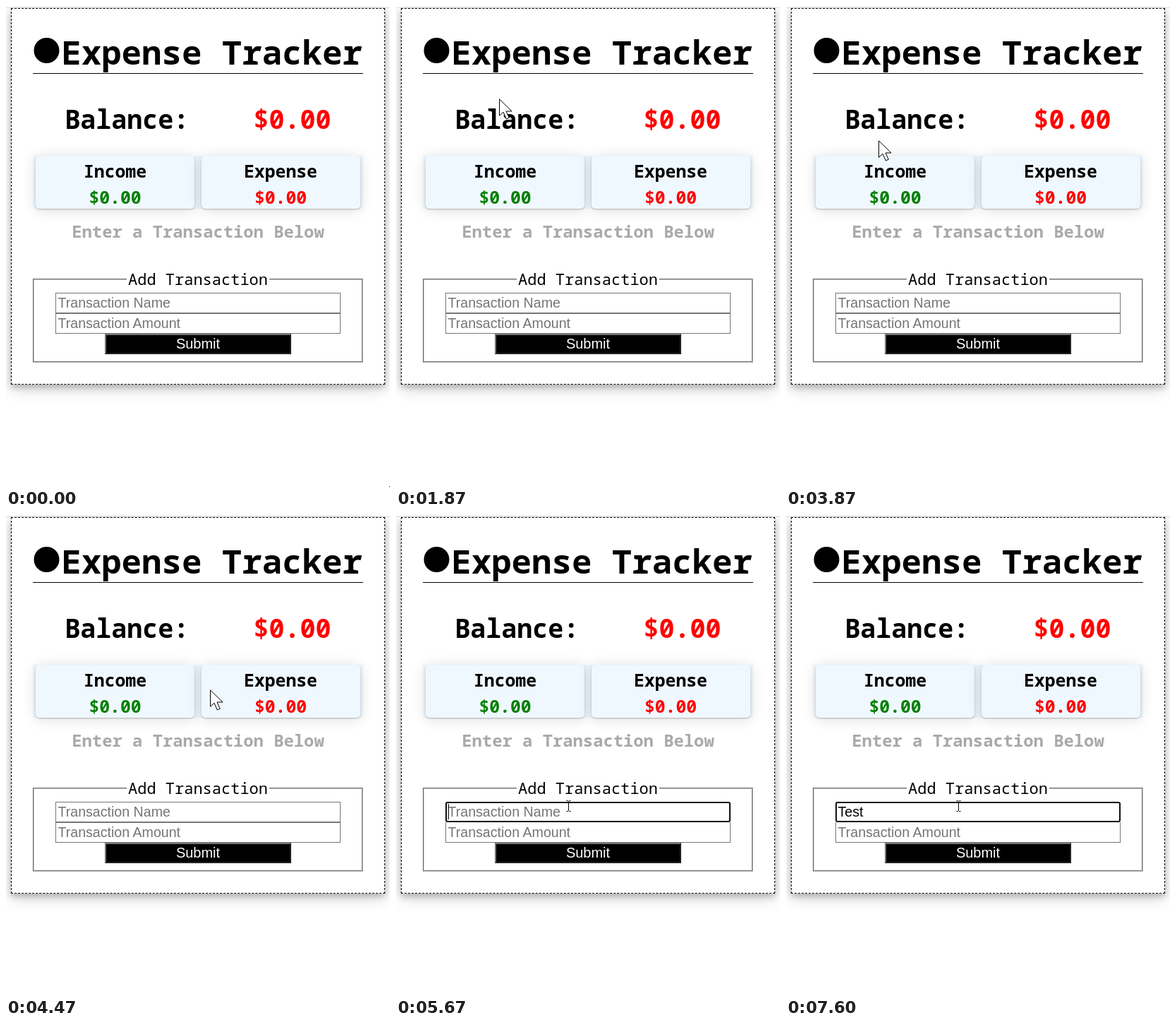
An HTML page that plays this animation: 544x681 px, repeating every 8000 ms.

```html
<!DOCTYPE html>
<html lang="en">
<head>
<meta charset="utf-8">
<title>Expense Tracker</title>
<style>
  html, body { margin: 0; width: 100%; height: 100%; overflow: hidden; background: #fff; }
  .stage { position: relative; width: 544px; height: 681px; overflow: hidden; }
  .stage > * { position: absolute; box-sizing: border-box; }
  .edge { left: 0; top: 2px; width: 544px; height: 1px; background: #e0e0e0; }
  .panel {
    left: 7px; top: 3px; width: 530px; height: 533px;
    background: #fff; border: 1px dashed #000;
    box-shadow: 0 4px 8px rgba(0, 0, 0, .2), 0 6px 20px rgba(0, 0, 0, .19);
  }
  .rule { left: 38px; top: 95px; width: 468px; height: 1px; background: #000; }
  .row { left: 38px; top: 212px; width: 468px; height: 75px; background: aliceblue; }
  .card {
    top: 212px; width: 225px; height: 75px; border-radius: 5px; background: aliceblue;
    box-shadow: 0 1px 2px rgba(0, 0, 0, .25), 0 2px 20px rgba(0, 0, 0, .14);
  }
  .income { left: 42px; }
  .expense { left: 277px; }
  .form { left: 38px; top: 386px; width: 468px; height: 119px; border: 2px groove #c0c0c0; }
  .gap { left: 171px; top: 380px; width: 202px; height: 16px; background: #fff; }
  .field { left: 70px; width: 404px; height: 29px; border: 1px solid #767676; background: #fff; }
  .name { top: 406px; }
  .amount { top: 435px; }
  .name.hover { border-color: #4f4f4f; }
  .name.focus { border: 2px solid #101010; border-radius: 3px; box-shadow: 0 0 0 1px #fff; z-index: 1; }
  .button { left: 140px; top: 464px; width: 264px; height: 29px; background: #000; border: 2px outset #767676; }
  svg { left: 0; top: 0; z-index: 2; }
  text { white-space: pre; }
  .mono { font-family: "Noto Sans Mono", "DejaVu Sans Mono", monospace; font-weight: 600; }
  .mid { text-anchor: middle; }
  .h1 { font-size: 47.4px; }
  .h2 { font-size: 36.67px; }
  .h3 { font-size: 24.75px; }
  .note { font-size: 23.83px; fill: #a9a9a9; }
  .legend { font-size: 22px; font-weight: 400; }
  .sans { font: 19.6px "Liberation Sans", Arial, sans-serif; }
  .submit { font-size: 20px; fill: #fff; }
  .hint { fill: #757575; }
  .red { fill: red; }
  .green { fill: green; }
</style>
</head>
<body>
<div class="stage">
  <div class="edge"></div>
  <div class="panel"></div>
  <div class="rule"></div>
  <div class="row"></div>
  <div class="card income"></div>
  <div class="card expense"></div>
  <div class="form"></div>
  <div class="gap"></div>
  <div class="field name" id="field"></div>
  <div class="field amount"></div>
  <div class="button"></div>
  <svg width="544" height="681" viewBox="0 0 544 681">
    <circle cx="57.5" cy="63" r="18"/>
    <g class="mono">
      <text class="h1" x="78.3" y="83">Expense Tracker</text>
      <text class="h2" x="83.3" y="174">Balance:</text>
      <text class="h2 red" x="350.5" y="174">$0.00</text>
      <g class="h3 mid">
        <text x="154.5" y="243">Income</text>
        <text class="green" x="154.5" y="280">$0.00</text>
        <text x="389" y="243">Expense</text>
        <text class="red" x="389" y="280">$0.00</text>
      </g>
      <text class="note mid" x="272" y="328">Enter a Transaction Below</text>
      <text class="legend mid" x="272" y="395">Add Transaction</text>
    </g>
    <g class="sans">
      <text class="hint" id="hint" x="73.5" y="427">Transaction Name</text>
      <text id="typed" x="73.5" y="427"></text>
      <text class="hint" x="73.5" y="456">Transaction Amount</text>
      <text class="submit mid" x="272" y="485">Submit</text>
    </g>
    <rect id="caret" x="74" y="409" width="1" height="22"/>
    <rect id="speck" x="543" y="680" width="1" height="1"/>
    <g id="cursor">
      <path id="arrow" d="M.5 .9V24.3L6 19.2L10.3 29L14.2 27.3L10 18H18Z" fill="#fff" stroke="#000"/>
      <path id="beam" d="M-2.5 -7.5H-.5L.5 -6.5L1.5 -7.5H3.5M.5 -6.5V6.5M-2.5 7.5H-.5L.5 6.5L1.5 7.5H3.5" fill="none" stroke="#000"/>
    </g>
  </svg>
</div>
<script>
  const LOOP = 8000, FOCUS = 5670, BLINK = 530;
  const el = id => document.getElementById(id);
  const show = (id, on) => { el(id).style.visibility = on ? 'visible' : 'hidden'; };

  function move(from, to, d) {
    const curve = document.createElementNS('http://www.w3.org/2000/svg', 'path');
    curve.setAttribute('d', d);
    return { from, to, curve, length: curve.getTotalLength() };
  }

  // pointer moves: first and last tick (1/15 s), curve
  const moves = [
    move(7, 12, 'M436 656Q290 500 125 494'),
    move(15, 17, 'M125 494V487'),
    move(20, 25, 'M125 487C66 180 72 120 95 134'),
    move(27, 34, 'M95 134Q200 130 328 108'),
    move(50, 63, 'M328 108C250 150 200 195 132 190C97 188 97 194 143 193'),
    move(63, 76, 'M143 193C355 190 320 330 175 397'),
    move(76, 80, 'M175 397L230 424'),
    move(81, 85, 'M230 424Q238 422 244 412')
  ];

  const word = 'Test ';
  const keyTimes = [5870, 6130, 6730, 6870, 7070];

  const easeOut = u => 1 - (1 - u) ** 1.6;

  // ticks start at multiples of 1/15 s, rounded to 10 ms
  function tickAt(t) {
    const k = Math.floor(t * .015 + .06);
    return Math.round(k * 20 / 3) * 10 > t ? k - 1 : k;
  }

  function drawPointer(t) {
    const k = tickAt(t);
    const now = moves.filter(m => m.from <= k).pop();
    show('speck', t < 200);
    show('arrow', false);
    show('beam', false);
    if (!now) return false;
    const u = Math.min(1, (k - now.from) / (now.to - now.from));
    const p = now.curve.getPointAtLength(now.length * easeOut(u));
    const x = Math.round(p.x), y = Math.round(p.y);
    const overText = k > 63 && (y > 378 || (y > 308 && y < 332));
    show(overText ? 'beam' : 'arrow', true);
    el('cursor').setAttribute('transform', `translate(${x} ${y})`);
    return k > 76 && y > 406;
  }

  function drawField(t, hover) {
    const focus = t >= FOCUS;
    el('field').className = 'field name' + (focus ? ' focus' : hover ? ' hover' : '');
    const count = keyTimes.filter(k => k <= t).length;
    const since = count ? keyTimes[count - 1] : FOCUS;
    const typed = el('typed');
    typed.textContent = word.slice(0, count);
    show('hint', !count);
    show('caret', focus && Math.floor((t - since) / BLINK) % 2 === 0);
    const width = count ? typed.getComputedTextLength() : .5;
    el('caret').setAttribute('x', Math.floor(73.5 + width));
  }

  const begin = performance.now();
  function frame() {
    const t = (performance.now() - begin) % LOOP;
    drawField(t, drawPointer(t));
    requestAnimationFrame(frame);
  }
  frame();
</script>
</body>
</html>
```
